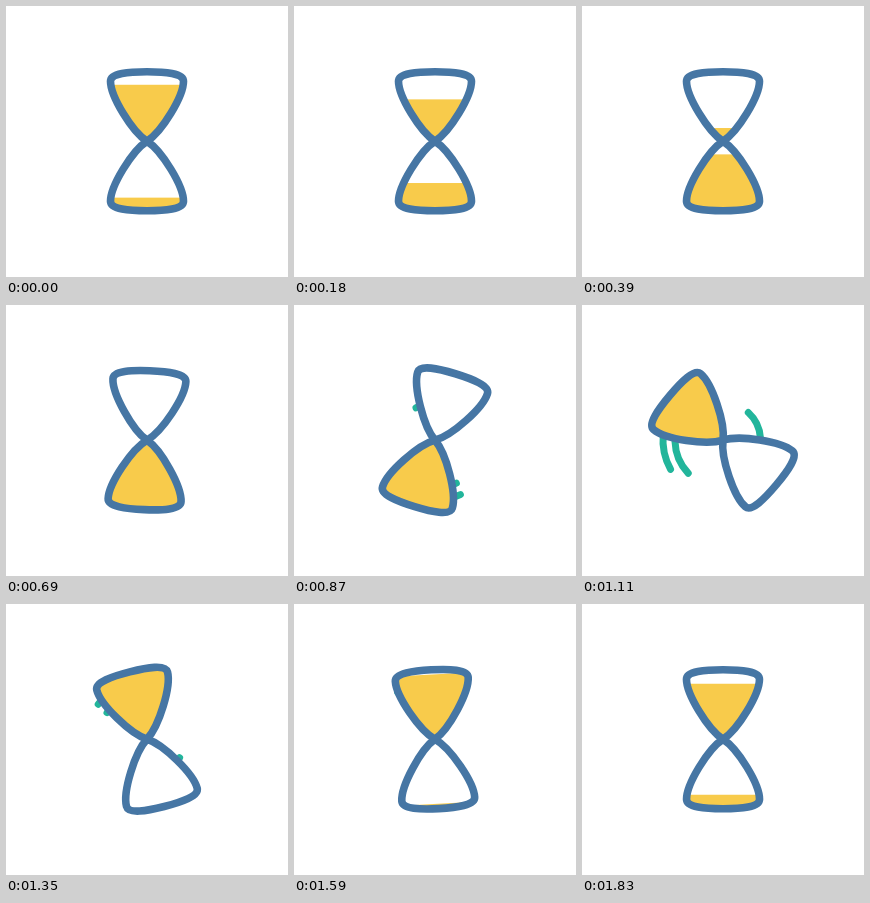
An HTML page with a canvas that plays this animation: 282 by 271 pixels, repeating every 1860 ms.

```html
<!DOCTYPE html>
<html lang="en">
<head>
<meta charset="utf-8">
<title>Hourglass</title>
<style>
html, body { margin: 0; width: 100%; height: 100%; overflow: hidden; background: #fff; }
canvas { display: block; }
</style>
</head>
<body>
<canvas id="stage" width="282" height="271"></canvas>
<script>
const ctx = document.getElementById('stage').getContext('2d');
const BLUE = '#4676a4', SAND = '#f8cb4b', TEAL = '#22b59b';
const LOOP = 1860, STEP = 30, TURN_START = 540, FALL_START = 1440, FALL_TIME = 915;
const DEG = Math.PI / 180;

// Upper bulb, with the neck at the origin
const bulb = new Path2D(
  'M0 0C-15-9.5-36.5-45-36.5-60C-36.5-68-18-69.5 0-69.5' +
  'C18-69.5 36.5-68 36.5-60C36.5-45 15-9.5 0 0Z');

// Motion trails: radius, side (90 = lower bulb, -90 = upper), hidden angle, delay in ms
const trails = [[60, 90, 33, 78], [48, 90, 33, 96], [37.5, -90, 37, 96]];

// Cubic Bezier easing through (x1, 0) and (x2, 1)
function ease(u, x1, x2) {
  if (u <= 0) return 0;
  if (u >= 1) return 1;
  let lo = 0, hi = 1, s;
  for (let i = 0; i < 24; i++) {
    s = (lo + hi) / 2;
    const x = 3 * s * (1 - s) ** 2 * x1 + 3 * s * s * (1 - s) * x2 + s ** 3;
    if (x < u) lo = s; else hi = s;
  }
  return s * s * (3 - 2 * s);
}

const turn = t => 180 * ease((t - TURN_START) / (LOOP - TURN_START), 0.65, 0);

function drawTrails(t) {
  ctx.strokeStyle = TEAL;
  ctx.lineWidth = 7;
  ctx.lineCap = 'round';
  const now = turn(t);
  for (const [radius, side, hidden, delay] of trails) {
    const axis = now + side;
    const tail = axis - hidden - (now - turn(t - delay));
    ctx.beginPath();
    ctx.arc(0, 0, radius, tail * DEG, axis * DEG);
    ctx.stroke();
  }
}

function fillBulb(flip, level) {
  ctx.save();
  ctx.scale(1, flip);
  ctx.fillStyle = '#fff';
  ctx.fill(bulb);
  ctx.clip(bulb);
  ctx.fillStyle = SAND;
  // The sand rests on the neck in the upper bulb, on the base in the lower one
  if (flip > 0) ctx.fillRect(-45, level, 90, -level);
  else ctx.fillRect(-45, -75, 90, 75 - level);
  ctx.restore();
}

function strokeBulb(flip) {
  ctx.save();
  ctx.scale(1, flip);
  ctx.stroke(bulb);
  ctx.restore();
}

function draw(t) {
  const refilled = t >= FALL_START;
  const fallTime = refilled ? t - FALL_START : t + 375;
  const fall = 66 * ease(fallTime / FALL_TIME, 0.7, 0.8);

  ctx.setTransform(1, 0, 0, 1, 0, 0);
  ctx.fillStyle = '#fff';
  ctx.fillRect(0, 0, 282, 271);
  ctx.translate(141, 135.2);
  if (t > TURN_START) drawTrails(t);

  ctx.rotate((turn(t) - (refilled ? 180 : 0)) * DEG);
  fillBulb(1, fall - 66);
  fillBulb(-1, 66 - fall);
  ctx.strokeStyle = BLUE;
  ctx.lineWidth = 7.6;
  ctx.lineJoin = 'round';
  strokeBulb(1);
  strokeBulb(-1);
}

const start = performance.now();
function tick() {
  const t = (performance.now() - start) % LOOP;
  draw(Math.floor(t / STEP) * STEP);
  requestAnimationFrame(tick);
}
tick();
</script>
</body>
</html>
```
